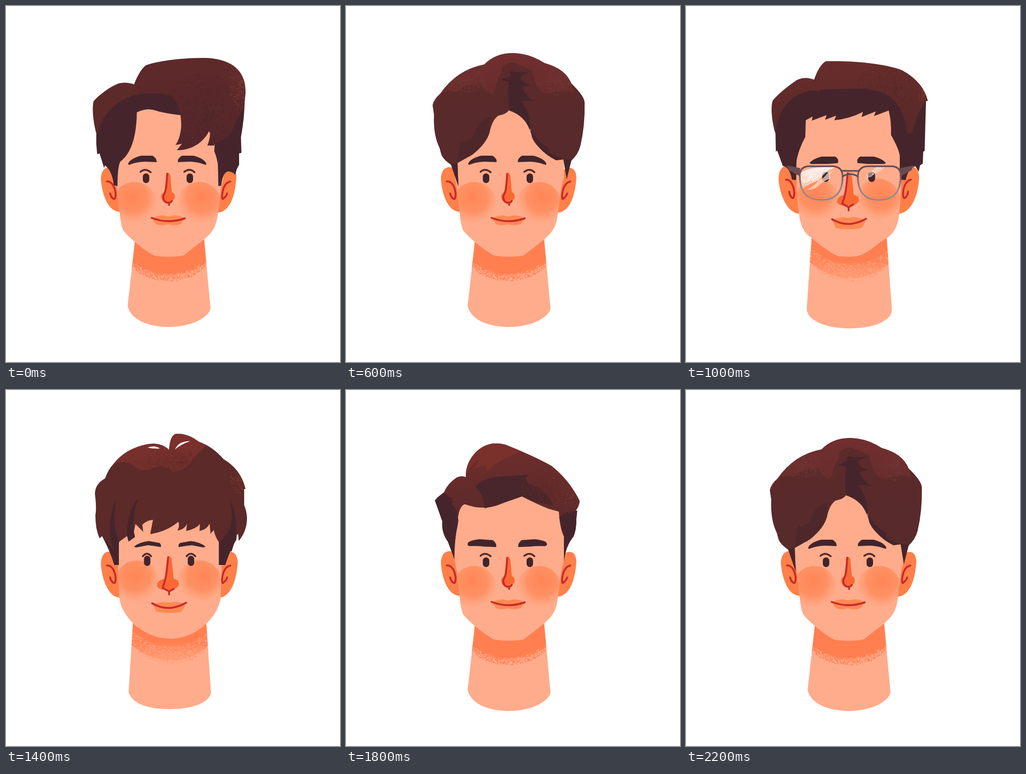
An HTML page with a canvas that plays this animation: 725x773 px, repeating every 2400 ms.

```html
<!DOCTYPE html>
<html lang="en">
<head>
<meta charset="utf-8">
<title>Haircuts</title>
<style>
html, body { margin: 0; width: 100%; height: 100%; overflow: hidden; background: #fff; }
canvas { display: block; width: 725px; height: 773px; }
</style>
</head>
<body>
<canvas id="c"></canvas>
<script>
const W = 725, H = 773, STEP = 200;
const canvas = document.getElementById('c');
const g = canvas.getContext('2d');
const dpr = window.devicePixelRatio || 1;
canvas.width = W * dpr;
canvas.height = H * dpr;

const SKIN = '#ffac8c', ORANGE = '#ff7f50', EAR = '#ff8049', RED = '#c9282d';
const DARK = '#45252b', BROWN = '#5b2a29', GLOW = '#833c34';

let seed = 1;
const rnd = () => (seed = seed * 16807 % 2147483647) / 2147483647;

function paint(c) {
  if (!Array.isArray(c)) return c;
  const [a, b, y0, y1] = c;
  const grad = g.createLinearGradient(0, y0, 0, y1);
  grad.addColorStop(0, a);
  grad.addColorStop(1, b);
  return grad;
}
function fill(d, c) {
  g.fillStyle = paint(c);
  g.fill(new Path2D(d));
}
function line(d, c = RED, w = 4) {
  g.strokeStyle = paint(c);
  g.lineWidth = w;
  g.lineCap = g.lineJoin = 'round';
  g.stroke(new Path2D(d));
}
function clipped(d, draw) {
  g.save();
  g.clip(new Path2D(d));
  draw();
  g.restore();
}
function mirrored(axis, draw) {
  draw();
  g.save();
  g.translate(axis * 2, 0);
  g.scale(-1, 1);
  draw();
  g.restore();
}
function grain(d, color, x, y, rx, ry, n) {
  clipped(d, () => {
    g.fillStyle = color;
    for (let i = 0; i < n; i++) {
      const a = rnd() * 6.283, r = Math.pow(rnd(), .7);
      g.fillRect(x + Math.cos(a) * rx * r, y + Math.sin(a) * ry * r, 1.2, 1.2);
    }
  });
}

// Heads: shade = [left x, left y, lowest y, right x, right y, softness]
const slim = {
  neck: 'M281 500L264 651C270 680 306 697 356 697C402 696 437 678 444 658L429 495Z',
  shade: [272, 570, 597, 437, 565, 16],
  ears: ['M242 358C230 345 206 346 206 376C208 406 220 446 247 447Z',
    'M464 363C478 347 500 345 500 374C497 415 485 446 460 449Z'],
  inner: 'M219 381C231 380 237 395 238 409Q238 420 234 419Q228 416 226 407M487 381C474 384 470 400 469 412Q469 422 472 418Q478 414 480 407',
  face: 'M236 225V370L240 390Q245 430 247 452Q250 480 255 488C272 508 302 532 322 542Q352 547 385 542L430 507C450 490 456 478 460 452L467 395L473 370V225Z',
  brow: 'M265 343Q268 332 293 325L318 325Q328 331 327 339L300 338Q282 339 270 344Q265 346 265 343Z',
  axis: 350, cheek: [324, 374, 382],
  eyes: [304, 399, 374, 7, 10.5], lid: 'M292 360Q302 351 314 361M387 360Q399 351 409 361',
  nose: 'M349 362Q357 361 357 372L360 404Q368 407 366 418Q361 425 350 427Q335 425 337 410L344 403Z',
  bridge: 'M350 364C348 385 349 400 342 411Q340 425 350 427Q358 428 360 423M354 427V432',
  lips: 'M316 461Q335 453 344 455Q352 459 361 455Q375 453 388 461Q383 471 378 474Q365 478 352 474Q338 478 326 474Z',
  mouth: 'M316 460Q352 474 388 461'
};
const keen = Object.assign({}, slim, {
  face: 'M239 225L239 385Q244 430 246 450L251 470C268 498 302 532 322 544Q352 549 385 544C424 522 454 494 462 456L470 390V225Z',
  brow: 'M266 330Q275 320 292 318L322 324Q330 332 328 339L300 334L275 333Q266 334 266 330Z',
  cheek: [327, 371, 378],
  lips: 'M316 456Q335 448 344 450Q352 454 361 450Q375 448 388 456Q384 466 378 469Q365 473 352 469Q338 473 326 469Z',
  mouth: 'M316 455Q352 468 388 456'
});
const calm = Object.assign({}, slim, {
  brow: 'M264 334Q264 327 290 324L319 326Q328 334 326 341L300 340Q285 338 268 339Q263 338 264 334Z'
});
const elder = {
  neck: 'M274 500L263 664C268 690 310 707 360 707C412 706 452 688 455 668L442 495Z',
  shade: [268, 557, 601, 450, 563, 40],
  ears: ['M238 350C228 336 199 336 199 374C201 410 220 449 246 449Z',
    'M478 353C490 335 517 335 516 374C513 414 496 448 468 448Z'],
  inner: 'M218 370L226 376M223 399Q226 413 234 411M498 371C486 374 482 388 481 404Q481 415 485 412Q491 408 491 400',
  face: 'M238 235V390Q242 430 245 455Q248 478 254 486C272 506 312 532 335 543Q358 547 388 542C410 532 420 514 442 502C462 486 470 470 471 445L479 390L463 235Z',
  brow: 'M266 328Q272 318 295 314L325 320Q334 330 331 335L300 331Q285 328 272 331Q265 332 266 328Z',
  axis: 355.5, cheek: [330, 378, 370],
  eyes: [306, 408, 366, 7.5, 12], lid: 'M293 353Q304 341 316 352M398 352Q409 341 420 353',
  nose: 'M354 353Q363 352 363 362L367 406Q378 408 376 422Q370 432 350 431Q334 428 335 416Q337 408 347 406Z',
  bridge: 'M356 355C354 382 350 404 341 428L357 433L368 428M357 433V440',
  lips: 'M319 460Q357 470 396 460Q388 474 380 477Q355 479 332 477Z',
  mouth: 'M319 460Q357 474 396 460'
};
const warm = {
  neck: 'M273 500L262 658C264 686 310 700 355 700C402 700 446 686 447 660L435 495Z',
  shade: [267, 560, 599, 443, 563, 38],
  ears: ['M240 358C226 341 201 341 201 376C203 410 220 450 246 451Z',
    'M465 358C482 343 507 343 506 376C503 414 488 449 462 451Z'],
  inner: 'M217 377C227 376 234 390 235 406Q235 418 231 417Q225 413 224 403M488 377C475 381 471 397 471 410Q472 420 476 416Q481 412 482 403',
  face: 'M240 225V390Q242 430 246 456Q250 482 262 495C285 514 308 534 330 543Q352 546 372 543C400 536 415 514 436 504C456 490 461 470 463 450L467 390V225Z',
  brow: 'M268 341Q275 332 294 327L324 327Q332 331 330 341L308 343L272 343Z',
  axis: 351, cheek: [330, 372, 375],
  eyes: [303, 403, 371, 7.5, 11], lid: '',
  nose: 'M351 361Q360 361 360 372L364 410Q377 412 375 424Q369 435 350 434Q326 434 328 422Q331 412 344 410Z',
  bridge: 'M351 363C348 390 348 406 339 429L353 437L363 431M353 437V444',
  lips: 'M317 464L343 458Q352 462 362 458L390 463Q386 478 380 482Q352 488 325 482Z',
  mouth: 'M317 463Q352 484 391 462'
};
const young = Object.assign({}, warm, {
  neck: 'M276 500L266 656C274 682 310 693 355 693C402 693 442 680 445 657L434 495Z',
  shade: [270, 557, 595, 440, 561, 38],
  ears: ['M243 360C230 345 206 346 206 378C208 410 222 450 247 451Z',
    'M466 362C480 346 503 346 503 376C500 414 488 449 463 451Z'],
  inner: slim.inner,
  face: 'M243 230V390L246 452C252 495 300 540 357 540C410 540 458 498 466 452L468 390V230Z',
  brow: 'M278 340Q290 330 310 328L333 332Q338 336 336 341Q318 338 308 337L282 342Z',
  axis: 355.5, cheek: [329, 375, 370],
  eyes: [306.5, 401.5, 371, 7, 11], lid: 'M297 361Q306 350 315 361M392 361Q401 350 411 361',
  bridge: 'M352 363C349 390 349 406 340 430L354 437L364 432M354 437V444',
  lips: 'M319 464L343 460Q352 463 362 460L390 463Q386 477 380 482Q352 487 326 481Z'
});

function drawNeck(h) {
  const [x0, y0, low, x1, y1, soft] = h.shade;
  const mid = 2 * low - (y0 + y1) / 2;
  const gentle = soft > 20, lift = gentle ? 10 : soft;
  fill(h.neck, SKIN);
  clipped(h.neck, () => {
    const tone = gentle ? [ORANGE, '#ffa37e', low - 48, low - 2] : ORANGE;
    fill(`M${x0} 480V${y0 - lift / 2}Q${(x0 + x1) / 2} ${mid - lift} ${x1} ${y1 - lift / 2}V480Z`, tone);
    for (let i = 0; i < 1300; i++) {
      const u = rnd(), v = 1 - u;
      const edge = v * v * y0 + 2 * u * v * mid + u * u * y1;
      const depth = soft * Math.pow(rnd(), .8), s = .8 + rnd() * 1.3;
      g.fillStyle = rnd() < .4 ? SKIN : gentle ? '#ff946b' : ORANGE;
      g.fillRect(x0 + (x1 - x0) * u, edge - depth, s, s);
    }
  });
}

function drawCheek(x, top, out) {
  const grad = g.createRadialGradient(x + out, top + 34, 0, x + out, top + 34, 58);
  grad.addColorStop(0, '#ff7f4edd');
  grad.addColorStop(.55, '#ff834faa');
  grad.addColorStop(1, '#ff966a00');
  g.fillStyle = grad;
  g.beginPath();
  g.ellipse(x, top + 45, 47, 45, 0, 0, 7);
  g.fill();
}

function drawHead(h) {
  drawNeck(h);
  h.ears.forEach(e => fill(e, EAR));
  fill(h.face, SKIN);
  clipped(h.face, () => {
    const [l, r, top] = h.cheek;
    drawCheek(l - 45, top, -4);
    drawCheek(r + 45, top, 6);
  });
  line(h.inner);
  const [lx, rx, ey, w, t] = h.eyes;
  g.fillStyle = '#43242a';
  for (const x of [lx, rx]) {
    g.beginPath();
    g.roundRect(x - w, ey - t, w * 2, t * 2, w);
    g.fill();
  }
  if (h.lid) line(h.lid, '#552a2a');
  mirrored(h.axis, () => fill(h.brow, '#42252b'));
  fill(h.nose, '#fa6934');
  line(h.bridge);
  fill(h.lips, '#ff8952');
  line(h.mouth);
}

function moustache() {
  line('M278 352L289 357M427 353L438 348', '#ff8a60', 1.6);
  fill('M316 450C328 440 346 439 357 443C370 438 388 441 398 451L357 453Z', '#968983');
  fill('M312 453C326 446 345 444 357 446C370 444 386 446 400 453C386 459 370 458 357 453C342 459 328 459 312 453Z', '#494754');
}

function glasses() {
  const lens = 'M247 370Q246 350 265 348H320Q340 350 340 370C340 404 325 421 295 421C262 421 248 405 247 370Z';
  const glare = 'M249 364Q262 348 323 350Q306 358 297 368Q290 380 272 385L250 398Z';
  const frame = ['#6b4a50', '#9c878a', 355, 400];
  clipped(lens, () => {
    fill(glare, ['#ffffffd0', '#ffffff40', 350, 398]);
    fill('M320 356L312 366L313 374Q296 382 288 390Q278 400 264 398Q280 390 288 378Q298 376 306 364Z', '#ffe0d4b0');
  });
  grain(glare, '#fff', 270, 372, 38, 32, 600);
  const streak = 'M433 349Q420 361 411 363L402 371Q396 371 390 377Q395 361 413 350Z';
  fill(streak, '#fff0ea70');
  grain(streak, '#fff', 408, 364, 28, 16, 70);
  mirrored(356.5, () => {
    line(lens, frame, 3.6);
    fill('M218 346L248 352L246 369L224 357Z', '#6b4a50');
  });
  line('M337 358H376M340 370Q356 360 373 370', '#6b4a50', 3.6);
}

// Hair layers: [path, paint] fills, longer rows add grain inside the path
const quiffTop = 'M278 170Q289 141 303 129C340 116 400 112 440 113C492 117 521 142 520 188L517 222Q500 245 495 262Q485 290 452 298V303L437 303Q444 287 443 267C432 294 404 314 371 313L382 299L368 302C384 278 384 240 372 213Q362 192 350 193Q320 187 290 192Z';
const quiff = [
  ['M196 270V300L198 322L203 320L213 352L215 346C226 355 232 370 234 389L242 391Q242 350 248 338C264 326 283 300 284 231Q306 219 331 229Q358 235 379 237L384 300L440 270Q450 290 453 302L452 315Q458 330 460 345L461 391L467 390Q470 362 482 359Q493 360 498 367Q500 353 506 345V320L511 319L510 285Q518 240 518 205L400 180L250 172Z', DARK],
  ['M197 281C190 255 186 225 190 207C200 195 225 175 245 168Q260 164 278 170L312 185L290 192C250 195 206 235 197 281Z', BROWN],
  [quiffTop, ['#5f2929', '#55272a', 113, 300]],
  [quiffTop, DARK, 430, 245, 90, 100, 1800],
  [quiffTop, GLOW, 512, 165, 30, 62, 800]
];

const shagTop = 'M230 169Q240 164 245 152Q265 157 288 154Q302 125 345 123Q364 123 376 130Q391 131 397 118Q400 129 391 136Q407 133 424 144Q443 145 457 132Q455 150 445 155Q462 166 464 180';
const shagBody = shagTop + 'L475 184L469 187Q478 198 488 203L483 207Q491 219 494 232Q500 238 505 241L494 238Q495 264 519 274Q509 281 499 278L488 288Q470 262 455 235L450 256Q437 264 430 289Q420 283 421 276Q403 278 390 263Q360 268 340 255L336 262L318 258L301 263L289 260L297 275Q262 276 252 252L246 235Q234 272 214 291L208 280L210 266Q205 273 201 269L190 267L204 264Q216 247 217 232Q223 211 211 208Q228 198 249 178Z';
const shag = [
  ['M246 232L253 253Q243 270 244 285L239 303L244 320L238 325L241 411L232 363L229 360L220 348Q221 320 207 295L214 290L210 266Z', DARK],
  ['M455 232L450 262L463 290L465 330L471 360L469 405L481 352L490 345Q488 325 498 321L497 296Q500 285 502 274Z', DARK],
  [shagBody, ['#6a2d2a', '#642c2c', 130, 270]],
  [shagTop + 'Q440 195 420 160Q395 130 370 145Q345 130 325 150Q300 160 285 170Q270 180 249 178Z', '#79322d'],
  [shagBody, GLOW, 330, 138, 100, 28, 800],
  [shagBody, GLOW, 450, 180, 40, 45, 600],
  ['M298 200L303 181L320 180Q332 160 350 166Q375 163 390 153L388 164L416 172V188Q395 195 355 190Z', ['#43242a', '#642c2c', 160, 210]],
  [shagBody, '#55292b', 380, 212, 90, 45, 900]
];

const cropBody = 'M235 411C226 375 218 330 212 290Q207 270 209 265L216 257Q210 236 214 231L226 217Q229 205 230 203Q243 174 255 157Q276 136 308 126L307 131Q320 120 338 123L332 128Q350 117 371 127Q384 121 397 131L399 133Q405 126 413 128L408 134Q430 130 442 137Q448 146 445 154Q478 170 486 207Q507 220 507 235Q510 270 502 306L491 360Q484 380 481 404Q470 360 463 292Q460 270 430 253Q400 245 362 255Q350 256 325 248Q288 238 268 264Q261 275 255 291Q246 303 239 308L238 400Z';
const crop = [
  [cropBody, '#33313d'],
  ['M258 280Q258 247 270 233Q270 206 282 195Q293 183 309 204Q330 205 335 196Q350 188 370 200Q400 195 440 200Q500 220 455 268Q420 245 362 255Q288 238 258 280Z', ['#282631', '#2c2a35', 190, 250]],
  ['M463 300C480 300 500 280 507 250Q510 270 502 306L481 404Z', '#292733'],
  [cropBody, '#282631', 425, 205, 75, 50, 1300],
  [cropBody, '#494753', 240, 230, 30, 70, 300],
  [cropBody, '#494753', 480, 220, 28, 100, 450],
  [cropBody, '#211f2b', 222, 330, 20, 80, 500]
];

const partTop = 'M194 277C186 250 183 215 189 204Q208 183 240 161Q258 152 278 160Q288 130 303 120C370 118 440 127 470 140Q515 165 525 206L518 207Q500 240 494 265Q490 280 480 278C476 240 465 215 440 195Q410 175 340 180L290 182L288 187Q285 181 266 184C215 198 200 235 194 277Z';
const part = [
  ['M194 265L195 316L198 314L210 347Q225 350 230 377L239 378L240 335Q245 310 259 284L260 248L275 240L273 249L305 237L302 247L326 238L322 248Q355 245 384 230L381 241L412 229L408 239L440 227Q446 250 445 280Q462 310 464 325V377L477 378Q482 352 498 348L505 360L508 346L514 342L515 316L518 315L521 204L350 160L240 175Q188 205 194 265Z', DARK],
  [partTop, ['#672d2b', '#5a2929', 120, 270]],
  [partTop, '#51262a', 450, 185, 80, 75, 1200],
  [partTop, GLOW, 516, 195, 12, 28, 160]
];

const mopBody = 'M215 192Q193 204 193 226Q197 257 194 272Q194 302 203 322L209 317L235 350L245 330L263 317L266 329L279 320L277 310L281 291L298 308L296 293Q304 283 319 282L313 313Q350 307 374 286Q378 296 372 305Q386 304 393 291L391 306Q412 302 421 291L420 306Q436 303 442 290L444 312L451 304Q454 320 464 333L504 313L505 328Q524 305 523 276Q522 262 517 250V215H520Q510 172 472 150Q449 123 418 112Q395 94 370 95Q356 97 354 130Q335 112 305 118Q258 128 233 161Q222 172 215 192Z';
const mop = [
  ['M203 300L209 318Q226 350 235 380H245V326Z', DARK],
  ['M504 280L500 325Q485 350 476 380H462V325Z', DARK],
  [mopBody, BROWN],
  ['M233 161Q258 128 305 118Q335 112 354 130Q356 97 370 95Q395 94 418 112L435 121Q412 140 402 157Q385 176 362 178Q345 160 320 170Q290 180 278 165Q258 150 233 161Z', ['#7f302c', '#702f2c', 95, 175]],
  [mopBody, BROWN, 375, 158, 70, 28, 700],
  [mopBody, GLOW, 510, 195, 25, 30, 300],
  ['M307 125Q323 119 334 127Q320 128 307 125Z', '#fff'],
  ['M367 129Q374 111 400 111Q379 118 367 129Z', '#fff'],
  ['M263 317C262 280 274 248 287 236C276 265 273 292 280 319L266 329Z', DARK],
  ['M239 236Q228 290 246 330L235 352Q214 300 239 236Z', DARK],
  ['M485 236Q511 290 490 350L463 355V330Q502 300 485 236Z', DARK]
];

const waveBody = 'M193 240Q196 234 213 222Q219 205 240 190Q250 185 260 189Q259 164 275 143C296 116 322 112 347 119Q405 142 445 164Q483 193 507 240Q508 249 499 262Q497 274 500 281Q500 304 494 318Q477 338 473 372V318Q464 300 462 264L440 258Q410 246 382 231Q354 240 330 250Q295 262 258 248Q247 251 243 277Q245 284 242 295Q236 320 235 367Q229 335 221 329Q207 310 209 285Q204 270 193 240Z';
const wave = [
  [waveBody, ['#6d2e2b', '#5d2a2b', 115, 270]],
  ['M193 240L213 222Q224 235 231 234L230 249Q241 255 243 277L242 295Q235 325 235 367L221 329Q207 310 209 285Z', DARK],
  ['M463 277Q480 260 502 262L500 281Q500 304 494 318Q477 338 473 372V318Z', DARK],
  ['M260 190Q259 164 275 143C296 116 322 112 347 119L380 133Q325 155 308 176L301 164L277 171L292 150Q270 158 260 190Z', '#7a302b'],
  ['M281 210Q290 195 330 188L398 184Q383 194 400 204Q430 212 450 250Q410 246 382 231Q350 243 301 257Q302 235 281 210Z', '#48262b'],
  [waveBody, '#5f2b2b', 425, 215, 45, 45, 1200],
  [waveBody, GLOW, 490, 232, 35, 40, 250]
];

const curtainBody = 'M182 218Q184 205 198 193Q235 140 294 129Q325 98 375 106Q400 110 425 126Q470 138 483 170Q512 198 512 212Q513 262 503 305Q498 325 481 340L473 378L466 335L450 337Q405 310 397 285Q397 268 388 260Q379 237 362 232L348 228Q342 237 325 240Q312 248 306 275Q295 304 268 325L270 318L262 330L262 324L245 338L248 331L236 343L238 394Q232 365 222 347Q205 335 201 325L197 310Q183 282 185 238Z';
const curtain = [
  [curtainBody, ['#5c2a2b', '#572a2b', 130, 330]],
  ['M182 218Q184 205 198 193Q235 140 294 129Q325 98 375 106Q400 110 425 126Q470 138 483 170L490 190Q450 180 438 192Q420 198 405 170L398 142L360 125Q330 125 332 145L319 172Q319 192 308 192Q290 185 290 172Q260 165 235 188Q220 185 204 190Z', ['#702f2e', '#682d2d', 110, 190]],
  [curtainBody, '#753b38', 250, 163, 50, 28, 600],
  [curtainBody, '#753b38', 455, 165, 28, 32, 400],
  ['M331 162L350 154V144Q372 148 398 144Q377 149 372 157Q382 173 397 174L376 178Q386 202 404 209L375 207Q399 244 393 272Q382 240 348 229Q343 195 348 167Z', DARK],
  ['M306 245Q280 250 272 280Q260 300 244 295Q239 315 236 343L268 325Q300 300 306 275Z', '#4e272b'],
  ['M393 270Q420 305 432 308L437 322L466 335L450 337Q405 315 393 270ZM466 335L484 335L473 378ZM236 343L238 394L222 347Z', DARK]
];

const sweepBody = 'M235 367Q228 338 220 328Q204 305 202 285Q180 265 178 240Q180 215 205 203Q212 165 255 150Q290 114 365 116C440 116 500 145 522 180Q545 198 567 195Q555 220 530 224Q540 240 558 244Q530 262 508 256Q512 300 494 320Q476 342 473 372V318Q464 300 462 264Q420 258 390 236Q340 268 258 248Q246 258 243 280Q236 320 235 367Z';
const sweep = [
  [sweepBody, ['#6a2d2b', BROWN, 120, 260]],
  ['M235 367Q228 338 220 328Q204 305 202 285L215 245L245 250Q236 320 235 367ZM462 264L508 256Q512 300 494 320L473 372V318Z', DARK],
  ['M258 248Q300 195 390 200Q440 225 462 264Q420 258 390 236Q340 268 258 248Z', DARK],
  [sweepBody, GLOW, 430, 160, 90, 35, 700]
];

// Bumpy ring of curls around an ellipse
function ring(cx, cy, rx, ry, n, k) {
  let d = '';
  for (let i = 0; i <= n; i++) {
    const a = i / n * 2 * Math.PI, m = a - Math.PI / n;
    const x = cx + Math.cos(a) * rx * (1 - k), y = cy + Math.sin(a) * ry * (1 - k);
    d += i ? `Q${cx + Math.cos(m) * rx * (1 + k)} ${cy + Math.sin(m) * ry * (1 + k)} ${x} ${y}` : `M${x} ${y}`;
  }
  return d + 'Z';
}
const curlBack = ring(370.5, 245, 219, 148, 26, .05);
const curlFront = 'M222 200Q350 100 485 200L478 300L473 372L465 300Q462 262 442 258Q425 270 410 252Q392 262 376 246Q358 262 340 246Q322 262 305 250Q288 268 268 254Q246 262 242 300L235 367L218 290Z';
const curls = [
  [curlFront, [BROWN, DARK, 190, 300]],
  [curlBack, GLOW, 350, 140, 130, 36, 900]
];

const scenes = [
  { head: slim, hair: quiff },
  { head: warm, hair: part, fit: [.9735, 8.9, 1] },
  { head: keen, hair: shag },
  { head: slim, hair: curtain, fit: [1, 6, -2] },
  { head: elder, hair: crop, extra: moustache },
  { head: warm, hair: part, extra: glasses },
  { head: young, hair: quiff, fit: [1, 2.5, -3] },
  { head: young, hair: mop },
  { head: slim, hair: curls, back: curlBack },
  { head: calm, hair: wave },
  { head: slim, hair: sweep },
  { head: slim, hair: curtain }
];

function draw(s) {
  seed = 77;
  g.setTransform(dpr, 0, 0, dpr, 0, 0);
  g.fillStyle = '#fff';
  g.fillRect(0, 0, W, H);
  if (s.back) fill(s.back, ['#672d2b', '#4d272b', 110, 350]);
  drawHead(s.head);
  g.save();
  if (s.fit) g.transform(s.fit[0], 0, 0, 1, s.fit[1], s.fit[2]);
  for (const layer of s.hair) (layer.length > 2 ? grain : fill)(...layer);
  g.restore();
  if (s.extra) s.extra();
}

const start = performance.now();
let shown = -1;
function tick() {
  const i = Math.floor((performance.now() - start) / STEP) % scenes.length;
  if (i !== shown) draw(scenes[shown = i]);
  requestAnimationFrame(tick);
}
tick();
</script>
</body>
</html>
```
